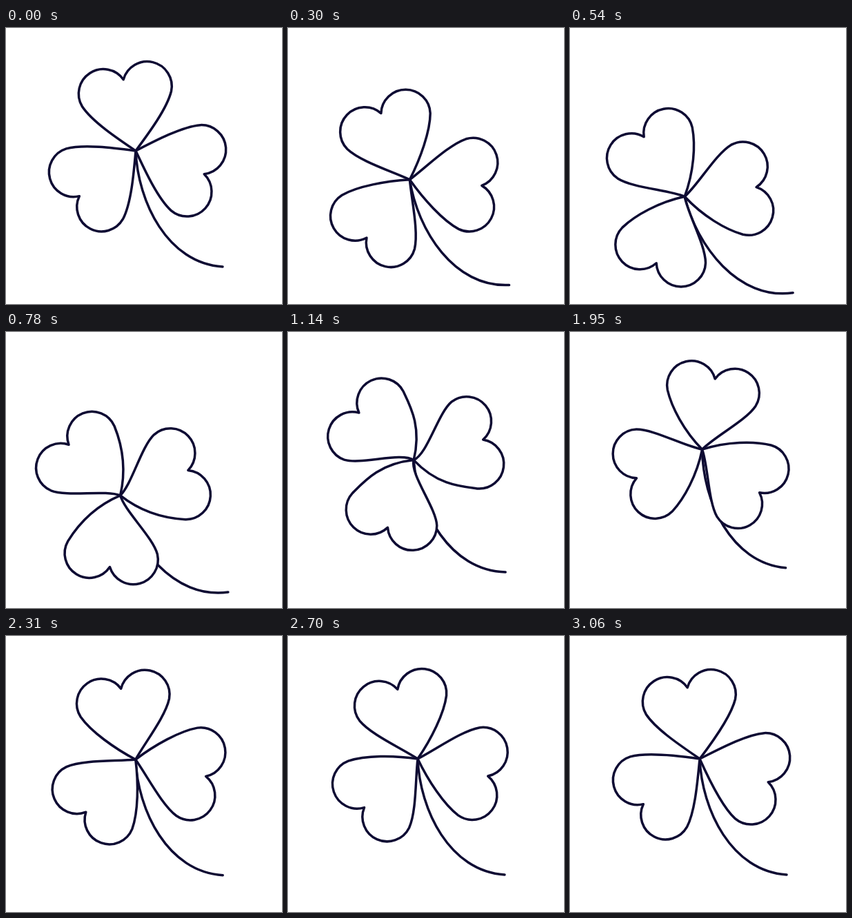
Animation, 400 px wide and 400 px high, one loop 3090 ms. Source, as an HTML page:

```html
<!DOCTYPE html>
<html lang="en">
<head>
<meta charset="utf-8">
<title>Clover</title>
<style>
  html, body { margin: 0; width: 100%; height: 100%; overflow: hidden; background: #fff; }
  svg { display: block; width: 100vw; height: 100vh; }
  path { fill: #fff; stroke: #0e0b33; stroke-width: 3.5; stroke-linecap: round; stroke-linejoin: round; }
  #stem { fill: none; }
</style>
</head>
<body>
<svg viewBox="0 0 400 400">
  <path id="stem" d="M0 0C3 74 46 163 126 168"/>
  <path class="leaf"/>
  <path class="leaf"/>
  <path class="leaf"/>
</svg>
<script>
const LOOP = 3090, STEP = 30, LAST = LOOP - STEP;
const REST = { x: 188, y: 178 };
const LEAF_ANGLES = [-9.8, 108.8, 231.2];

// The whole motion: how far the clover sinks, and how far its leaves turn.
const sink = curve([0, 0], [610, 68], [1470, -22], [2300, 1], [2650, 0]);
const turn = curve([0, 0], [780, -35.6], [970, -45], [1910, 20.5], [2500, -9], [LAST, 0]);

const leaves = document.querySelectorAll('.leaf');
const stem = document.getElementById('stem');

// Smooth curve through [time, value] points: brisk start, flat at each turning point.
function curve(...keys) {
  const end = keys.length - 1;
  const gap = i => (keys[i + 1][1] - keys[i][1]) / (keys[i + 1][0] - keys[i][0]);
  const slopes = keys.map((key, i) => {
    if (i === 0) return gap(0);
    if (i === end) return 0;
    const a = gap(i - 1), b = gap(i);
    return a * b <= 0 ? 0 : 2 * a * b / (a + b);
  });
  return time => {
    const t = Math.max(0, time);
    if (t >= keys[end][0]) return keys[end][1];
    const i = keys.findIndex(key => key[0] > t) - 1;
    const [t0, v0] = keys[i], [t1, v1] = keys[i + 1];
    const d = t1 - t0, u = (t - t0) / d, w = 1 - u;
    return v0 * w * w * (1 + 2 * u) + v1 * u * u * (3 - 2 * u)
      + d * u * w * (slopes[i] * w - slopes[i + 1] * u);
  };
}

// Heart with its tip at the origin; bend pushes both sides the same way near the tip.
function heart(bend) {
  return `M0 0C${23 + bend} -22 55.2 -52.7 65.5 -76.5`
    + 'A35.7 35.7 0 0 0 0 -104.8A35.7 35.7 0 0 0 -65.5 -76.5'
    + `C-55.2 -52.7 ${-23 + bend} -22 0 0Z`;
}

function draw(t) {
  // Sideways drift, stem tilt and leaf bend trail behind the main motion.
  const x = REST.x - 0.35 * sink(t - 60);
  const y = REST.y + sink(t);
  const tilt = -0.18 * sink(t - 40);
  const shape = heart(-0.45 * turn(t - 140));
  const size = 1 - 0.0011 * Math.max(0, -sink(t));
  const at = `translate(${x} ${y})`;

  stem.setAttribute('transform', `${at} rotate(${tilt})`);

  // Each leaf runs a little ahead of the one before it.
  const lead = 60 * Math.min(1, Math.max(0, (t - 200) / 500));
  leaves.forEach((leaf, i) => {
    const angle = LEAF_ANGLES[i] + turn(t + lead * i);
    leaf.setAttribute('d', shape);
    leaf.setAttribute('transform', `${at} rotate(${angle}) scale(${size})`);
  });
}

const start = performance.now();
function tick() {
  const t = (performance.now() - start) % LOOP;
  draw(Math.floor(t / STEP) * STEP);
  requestAnimationFrame(tick);
}
tick();
</script>
</body>
</html>
```
